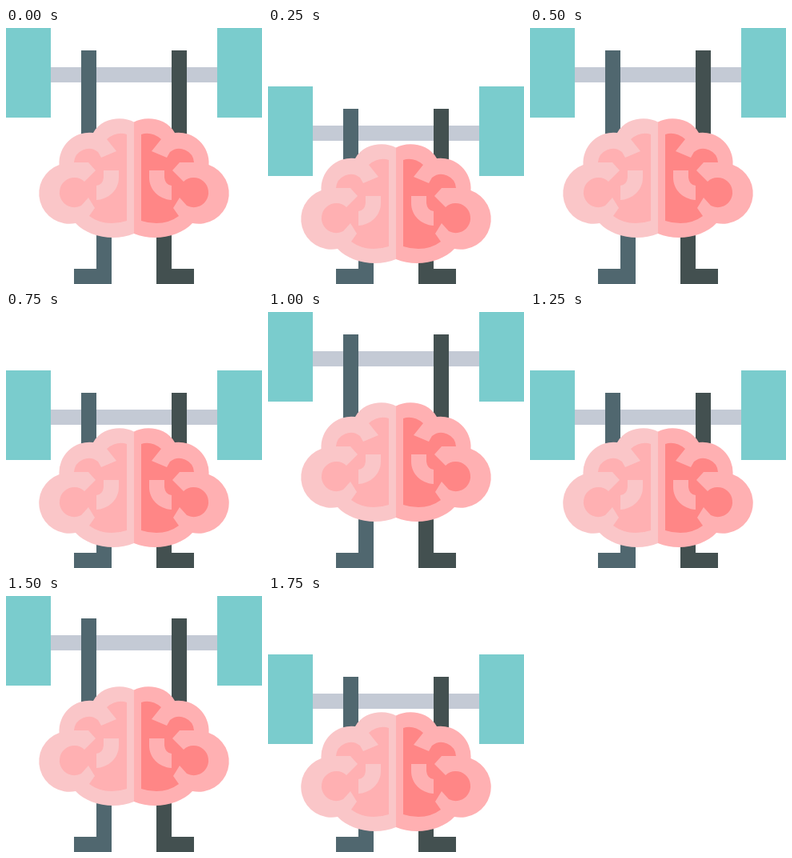
An HTML page that plays this animation: 320x320 px, repeating every 2000 ms.

```html
<!DOCTYPE html>
<html lang="en">
<head>
<meta charset="utf-8">
<title>Brain workout</title>
<style>
  html, body { margin: 0; width: 100%; height: 100%; overflow: hidden; background: #fff; }
  svg { display: block; width: 100%; height: 100%; }
</style>
</head>
<body>
<svg viewBox="0 0 320 320">
  <defs>
    <path id="lobe" d="M160 117.500C173 110 200 111 211 131A38 38 0 0 1 253.500 171A38 38 0 0 1 233 244C218 260 186 268 160 257Z"/>
    <path id="folds" d="M169 133Q182 129 194 139L182 154L201 162L205 155A18.500 18.500 0 0 1 235 168H217L208 178L222 192A18.500 18.500 0 1 1 226 222L217 212L209 225L216 235Q204 244 188 244Q178 244 169 241Z"/>
    <path id="groove" d="M179 178H198V187Q199 196 207 197V215C191 214 179 202 179 187Z"/>
  </defs>
  <path fill="#50676f" d="M113 240h19v80H85v-19h28z"/>
  <path fill="#435050" d="M207 240h-19v80h47v-19h-28z"/>
  <g id="barbell">
    <path fill="#c4cad5" d="M56 49h208v19H56z"/>
    <path fill="#7acccd" d="M0 0h56v112H0zM264 0h56v112h-56z"/>
    <path fill="#50676f" d="M94 28h19v115H94z"/>
    <path fill="#435050" d="M207 28h19v115h-19z"/>
  </g>
  <g id="brain">
    <g transform="matrix(-1 0 0 1 320 0)">
      <use href="#lobe" fill="#fac6c8"/>
      <use href="#folds" fill="#ffb0b2"/>
      <use href="#groove" fill="#fac6c8"/>
    </g>
    <use href="#lobe" fill="#ffb0b2"/>
    <use href="#folds" fill="#ff8686"/>
    <use href="#groove" fill="#ffb0b2"/>
  </g>
</svg>
<script>
  const HOLD = 250;
  const barbell = document.getElementById("barbell");
  const brain = document.getElementById("brain");
  const start = performance.now();

  const drop = (part, y) => part.setAttribute("transform", `translate(0 ${y})`);

  function render(time) {
    const lowered = Math.floor(Math.max(0, time) / HOLD) % 2;
    drop(barbell, lowered * 73);
    drop(brain, lowered * 32);
  }

  function tick(now) {
    render(now - start);
    requestAnimationFrame(tick);
  }

  render(0);
  requestAnimationFrame(tick);
</script>
</body>
</html>
```
